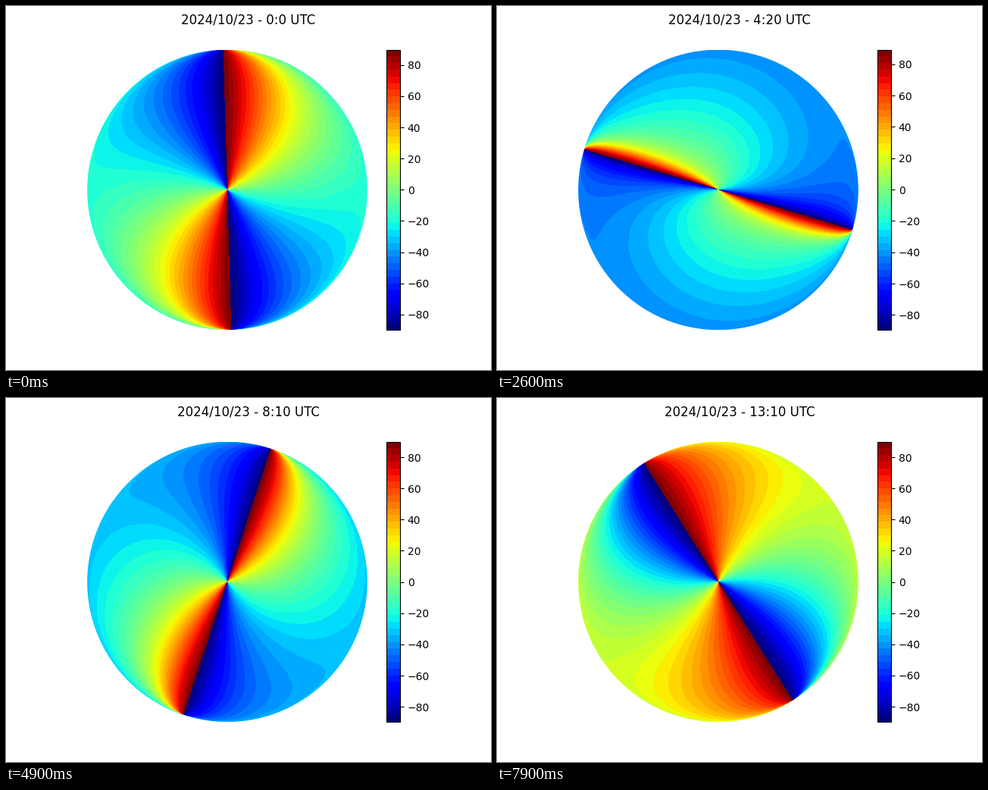
A matplotlib script for the animation above (8000 ms loop, 640 by 480 pixels).

```python
import numpy as np
import matplotlib.pyplot as plt
from matplotlib.animation import FuncAnimation
from matplotlib.patches import Circle

FRAMES, INTERVAL, STEP_MIN = 80, 100, 10
LAT, MIDNIGHT, BANDS, SIZE = np.radians(39.0), 4.865, 42, 370

# Sky dome seen from above: r = sin(zenith angle)
axis = (np.arange(SIZE) + 0.5) / SIZE * 2 - 1
x, y = np.meshgrid(axis, axis)
sin_z = np.minimum(np.hypot(x, y), 1)
cos_z = np.sqrt(1 - sin_z**2)
azimuth = np.arctan2(y, x)
ring = np.arange(1440) * 2 * np.pi / 1440


def sun(hours):
    """Direction of the solar meridian on the plot and sine of the altitude."""
    dec = np.radians(-11.4 - 0.0145 * hours)
    ha = np.radians(15 * (hours - MIDNIGHT))
    turn = np.arctan2(np.sin(ha),
                      np.cos(ha) * np.sin(LAT) + np.tan(dec) * np.cos(LAT))
    sin_alt = (np.sin(LAT) * np.sin(dec)
               - np.cos(LAT) * np.cos(dec) * np.cos(ha))
    return np.pi + turn, sin_alt


def polarization(az, sin_z, cos_z, hours):
    """Angle of polarization in degrees."""
    meridian, sin_alt = sun(hours)
    psi = meridian - az
    sin_psi = np.sin(psi)
    sin_psi = np.where(np.abs(sin_psi) < 1e-9, 1e-9, sin_psi)
    slope = sin_z * sin_alt + cos_z * (1 - sin_alt**2) * np.cos(psi) / sin_psi
    return np.degrees(np.arctan(slope))


fig, ax = plt.subplots(figsize=(6.4, 4.8), dpi=100)
sky = ax.imshow(np.zeros((SIZE, SIZE)), cmap=plt.get_cmap("jet", BANDS),
                vmin=-90, vmax=90, origin="lower", extent=(-1, 1, -1, 1),
                interpolation="nearest")
sky.set_clip_path(Circle((0, 0), 1, transform=ax.transData))
ax.axis("off")
fig.colorbar(sky, ax=ax)
title = fig.suptitle("")


def update(i):
    minutes = i * STEP_MIN
    hours = minutes / 60
    sky.set_data(polarization(azimuth, sin_z, cos_z, hours))
    zenith = polarization(ring, 0, 1, hours)
    sky.set_clim(zenith.min(), zenith.max())
    title.set_text(f"2024/10/23 - {minutes // 60}:{minutes % 60} UTC")
    return sky, title


anim = FuncAnimation(fig, update, frames=FRAMES, interval=INTERVAL,
                     repeat=True, repeat_delay=0, blit=False)
plt.show()
```
